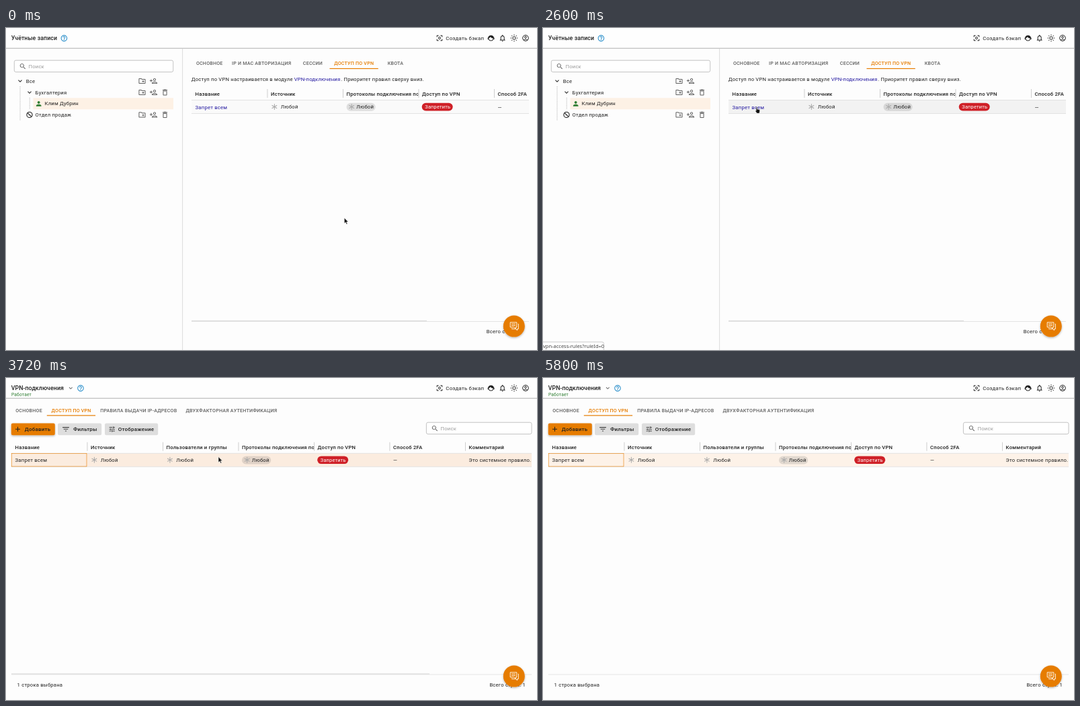
An HTML page for the animation above (5.84 s loop, 790 by 480 pixels).

```html
<!DOCTYPE html>
<html lang="ru">
<head>
<meta charset="utf-8">
<style>
html, body { margin: 0; width: 100%; height: 100%; overflow: hidden; background: #fdfdfd; }
svg { display: block; }
text { font: 7.68px Roboto, sans-serif; letter-spacing: .2px; fill: #212121; white-space: pre; }
.title { font-size: 8.78px; font-weight: 500; letter-spacing: .08px; }
.tab { font-size: 7.13px; font-weight: 500; fill: #616161; }
.head { font-weight: 500; }
.btn { font-size: 8px; font-weight: 500; }
.top { font-size: 7.9px; }
.link { fill: #2318a0; letter-spacing: .12px; }
.row { letter-spacing: .22px; }
.hint { fill: #9a9a9a; }
.chip { font-size: 7.4px; fill: #fff; }
.state { font-size: 6.58px; fill: #2e7d32; }
.url { font: 7.5px "Noto Sans", sans-serif; letter-spacing: 0; fill: #444; }
</style>
</head>
<body>
<svg id="stage" width="790" height="480" viewBox="0 0 790 480"></svg>
<script>
const ORANGE = '#e67c00', GREY = '#616161', INK = '#212121';
const LOOP = 5840, COL = 112.5;

const ICONS = {
  folder: 'M20 6h-8l-2-2H4c-1.1 0-2 .9-2 2v12c0 1.1.9 2 2 2h16c1.1 0 2-.9 2-2V8c0-1.1-.9-2-2-2zm0 12H4V6h5.2l2 2H20v10zm-8-4h2v2h2v-2h2v-2h-2v-2h-2v2h-2z',
  addUser: 'M15 12c2.2 0 4-1.8 4-4s-1.8-4-4-4-4 1.8-4 4 1.8 4 4 4zm0-6c1.1 0 2 .9 2 2s-.9 2-2 2-2-.9-2-2 .9-2 2-2zm0 8c-2.7 0-8 1.3-8 4v2h16v-2c0-2.7-5.3-4-8-4zm-6 4c.2-.7 3.3-2 6-2s5.8 1.3 6 2H9zm-3-3v-3h3v-2H6V7H4v3H1v2h3v3z',
  trash: 'M6 19c0 1.1.9 2 2 2h8c1.1 0 2-.9 2-2V7H6v12zM8 9h8v10H8V9zm7.5-5l-1-1h-5l-1 1H5v2h14V4z',
  down: 'M16.6 8.6 12 13.2 7.4 8.6 6 10l6 6 6-6z',
  search: 'M15.5 14h-.8l-.3-.3C15.4 12.6 16 11.1 16 9.5 16 5.9 13.1 3 9.5 3S3 5.9 3 9.5 5.9 16 9.5 16c1.6 0 3.1-.6 4.2-1.6l.3.3v.8l5 5 1.5-1.5zm-6 0C7 14 5 12 5 9.5S7 5 9.5 5 14 7 14 9.5 12 14 9.5 14z',
  user: 'M12 12c2.2 0 4-1.8 4-4s-1.8-4-4-4-4 1.8-4 4 1.8 4 4 4zm0 2c-2.7 0-8 1.3-8 4v2h16v-2c0-2.7-5.3-4-8-4z',
  help: 'M11 18h2v-2h-2v2zm1-16C6.5 2 2 6.5 2 12s4.5 10 10 10 10-4.5 10-10S17.5 2 12 2zm0 18c-4.4 0-8-3.6-8-8s3.6-8 8-8 8 3.6 8 8-3.6 8-8 8zm0-14c-2.2 0-4 1.8-4 4h2c0-1.1.9-2 2-2s2 .9 2 2c0 2-3 1.75-3 5h2c0-2.25 3-2.5 3-5 0-2.2-1.8-4-4-4z',
  focus: 'M5 15H3v4c0 1.1.9 2 2 2h4v-2H5zM5 5h4V3H5c-1.1 0-2 .9-2 2v4h2zm14-2h-4v2h4v4h2V5c0-1.1-.9-2-2-2zm0 16h-4v2h4c1.1 0 2-.9 2-2v-4h-2zM12 8c-2.2 0-4 1.8-4 4s1.8 4 4 4 4-1.8 4-4-1.8-4-4-4zm0 6c-1.1 0-2-.9-2-2s.9-2 2-2 2 .9 2 2-.9 2-2 2z',
  bell: 'M12 22c1.1 0 2-.9 2-2h-4c0 1.1.9 2 2 2zm6-6v-5c0-3.1-1.6-5.6-4.5-6.3V4c0-.8-.7-1.5-1.5-1.5s-1.5.7-1.5 1.5v.7C7.6 5.4 6 7.9 6 11v5l-2 2v1h16v-1zm-2 1H8v-6c0-2.5 1.5-4.5 4-4.5s4 2 4 4.5z',
  filter: 'M10 18h4v-2h-4zM3 6v2h18V6zm3 7h12v-2H6z',
  tune: 'M3 17v2h6v-2H3zM3 5v2h10V5H3zm10 16v-2h8v-2h-8v-2h-2v6h2zM7 9v2H3v2h4v2h2V9H7zm14 4v-2H11v2h10zm-6-4h2V7h4V5h-4V3h-2v6z',
  plus: 'M19 13h-6v6h-2v-6H5v-2h6V5h2v6h6z'
};

const text = (x, y, str, cls = '', extra = '') => `<text x="${x}" y="${y}" class="${cls}" ${extra}>${str}</text>`;
const rect = (x, y, w, h, fill, r = 0, extra = '') =>
  `<rect x="${x}" y="${y}" width="${w}" height="${h}" rx="${r}" fill="${fill}" ${extra}/>`;
const path = (d, color, w = 1, extra = '') => `<path d="${d}" fill="none" stroke="${color}" stroke-width="${w}" ${extra}/>`;
const ring = (x, y, r, color, w = 1) => `<circle cx="${x}" cy="${y}" r="${r}" fill="none" stroke="${color}" stroke-width="${w}"/>`;
const at = (x, y, s, body) => `<g transform="translate(${x} ${y}) scale(${s})">${body}</g>`;
const icon = (name, x, y, size = 12, color = GREY) =>
  at(x - size / 2, y - size / 2, size / 24, `<path d="${ICONS[name]}" fill="${color}"/>`);
const star = (x, y) => [0, 60, 120].map(a =>
  path('M0-4.4V4.4', '#a8a8a8', 1, `transform="translate(${x} ${y}) rotate(${a})"`)).join('');
const searchBox = (x, y, w) => rect(x, y, w, 17.4, '#fff', 2.4, 'stroke="#b4b4b4" stroke-width=".8"') +
  icon('search', x + 12.7, y + 9, 11.5) + text(x + 21.2, y + 11.8, 'Поиск', 'hint');
const tabs = (y, items, active) => items.map(([x, s], i) =>
  text(x, y, s, 'tab', i == active ? `style="fill:${ORANGE}"` : '')).join('');

function topBar() {
  let rays = '';
  for (let a = 0; a < 360; a += 45) rays += path('M0-3.9V-5.3', INK, 1, `transform="translate(756 15) rotate(${a})"`);
  return rect(0, 0, 790, 30, '#fefefe') + rect(0, 29.6, 790, 1.4, '#c6c6c6') +
    icon('focus', 645, 15, 11.5, INK) + text(654.3, 18, 'Создать бэкап', 'top') +
    ring(721.5, 15.3, 3.7, INK) + `<path d="M717 15.5a4.6 4.6 0 0 1 9.2 0q-4 .3-5.4-2.3-1 2-3.8 2.3z" fill="${INK}"/>` +
    path('M717.3 14.5v2.6M725.9 14.5v2.6', INK, 1.2) +
    icon('bell', 738.7, 15, 12, INK) + ring(756, 15, 2.2, INK) + rays +
    ring(773, 15, 4.3, INK) + ring(773, 13.8, 1.4, INK, .9) + path('M770 18q3-2.6 6 0', INK, .9);
}

function tree() {
  const tools = (y, n) => ['folder', 'addUser', 'trash'].slice(0, n).map((k, i) => icon(k, 202.5 + 17 * i, y, 12.2)).join('');
  return searchBox(12.3, 48.2, 236.4) + rect(40.5, 104.3, 208.5, 17, '#fdf1e5') +
    path('M21 87V138M35.2 104V121', '#999', .8, 'stroke-dasharray="1 1.2"') +
    icon('down', 21, 79, 11.5, INK) + text(29.8, 81.7, 'Все') + tools(79, 2) +
    icon('down', 35, 96, 11.5, INK) + text(43.6, 98.6, 'Бухгалтерия') + tools(96, 3) +
    icon('user', 48.7, 112.8, 11.5, '#2e7d32') + text(57.6, 115.4, 'Клим Дубрин') +
    ring(35, 129.4, 4.1, INK, 1.1) + path('M32.1 126.5l5.8 5.8', INK, 1.1) +
    text(43.6, 132.2, 'Отдел продаж') + tools(129.4, 3) +
    rect(262.2, 31, .9, 449, '#d9d9d9');
}

// Table whose first row starts at y; cells are [heading, kind, value].
function table(id, x, y, right, cells, bottom, thumb) {
  let out = `<rect id="${id}Row" x="${x}" y="${y}" width="${right - x}" height="20"/>` +
    rect(x, y - .4, right - x, .8, '#dedede') + rect(x, y + 19.6, right - x, .8, '#dedede');
  cells.forEach(([head, kind, value], i) => {
    const left = x + COL * i, tx = left + 5.8, base = y + 13;
    const w = Math.min(COL, right - left);
    out += `<svg x="${left}" y="${y - 20}" width="${w}" height="42">${text(5.6, 13.6, head, 'head')}</svg>`;
    if (i) out += rect(left, y - 16.5, .9, 13, '#c9c9c9');
    if (kind == 'chip') out += rect(tx - .3, y + 4.2, 43.2, 12, 'rgba(0,0,0,.11)', 6);
    if (kind == 'deny') out += rect(tx - .6, y + 4.2, 46, 11.7, '#cf2027', 5.8) + text(tx + 4, base - .2, value, 'chip');
    else if (kind == 'any' || kind == 'chip')
      out += star(tx + (kind == 'any' ? 5.1 : 7.4), y + 10) + text(tx + 14.5, base - .3, value);
    else out += text(tx - .2, base, value, kind);
  });
  return out + rect(x, bottom, right - x, .8, '#dedede') +
    `<rect id="${id}Bar" x="${x}" y="${bottom - 1.2}" width="${thumb}" height="1.4" fill="#dedede"/>`;
}

const name = ['Название', 'row', 'Запрет всем'], source = ['Источник', 'any', 'Любой'];
const rest = [['Протоколы подключения по VPN', 'chip', 'Любой'], ['Доступ по VPN', 'deny', 'Запретить'], ['Способ 2FA', 'row', '—']];

const accounts = text(7.8, 18.2, 'Учётные записи', 'title') + icon('help', 86.4, 15.2, 11.4, '#1e88c7') + tree() +
  tabs(55.1, [[282.9, 'ОСНОВНОЕ'], [336, 'IP И MAC АВТОРИЗАЦИЯ'], [441.8, 'СЕССИИ'], [488.2, 'ДОСТУП ПО VPN'], [567.8, 'КВОТА']], 3) +
  rect(481.5, 59.9, 72.3, 1.2, ORANGE) +
  text(275.8, 79.2, 'Доступ по VPN настраивается в модуле') + text(428.8, 79.2, 'VPN-подключения', 'link') +
  text(498.2, 79.2, '. Приоритет правил сверху вниз.') +
  table('a', 276, 107.5, 778, [['Название', 'link row', 'Запрет всем'], source, ...rest], 437, 350) +
  text(714.8, 455, 'Всего строк: 1');

const vpn = text(7.8, 18, 'VPN-подключения', 'title') + text(8, 27, 'Работает', 'state') +
  icon('down', 96.3, 15, 10.5) + icon('help', 111, 15.2, 11.4, '#1e88c7') +
  tabs(50.5, [[14.2, 'ОСНОВНОЕ'], [67.6, 'ДОСТУП ПО VPN'], [140.2, 'ПРАВИЛА ВЫДАЧИ IP-АДРЕСОВ'], [267.4, 'ДВУХФАКТОРНАЯ АУТЕНТИФИКАЦИЯ']], 1) +
  `<rect id="line" y="55.3" height="1.2" fill="${ORANGE}"/>` +
  rect(7.8, 67.6, 65, 17.6, ORANGE, 2.2, 'filter="url(#shade)"') + icon('plus', 17.5, 76.3, 12, INK) + text(27.8, 79.4, 'Добавить', 'btn') +
  rect(77, 67.6, 65.2, 17.6, '#dedede', 2.2) + icon('filter', 89, 76.3, 13, '#444') + text(100, 79.4, 'Фильтры', 'btn') +
  rect(147, 67.6, 79.2, 17.6, '#dedede', 2.2) + icon('tune', 157.8, 76.3, 11, '#444') + text(166.8, 79.4, 'Отображение', 'btn') +
  searchBox(625.4, 66.2, 156.6) +
  table('b', 8, 112.2, 782, [name, source, ['Пользователи и группы', 'any', 'Любой'], ...rest,
    ['Комментарий', 'row', 'Это системное правило.']], 441.6, 622) +
  `<g id="picked">${rect(8.2, 112.5, 111.8, 19.4, 'none', 0, `stroke="${ORANGE}" stroke-width=".6"`)}
   ${text(16.6, 459.5, '1 строка выбрана')}</g>` + text(719.4, 459.5, 'Всего строк: 1');

const fab = `<circle cx="755.8" cy="444.6" r="16" fill="${ORANGE}" filter="url(#shade)"/>` +
  path('M750.2 438.8h9.6v7.2h-1.6v2.2l-2.4-2.2h-5.6zM752 441.2h6M752 443.6h6M761.6 441.2h.8v7.4h-1.8v2l-2.4-2h-5.6v-1', '#fff', .9);

const $ = id => document.getElementById(id);
$('stage').innerHTML = `<defs><filter id="shade" x="-30%" y="-30%" width="160%" height="170%">
  <feDropShadow dx="0" dy="1.2" stdDeviation="1.4" flood-opacity=".3"/></filter></defs>
  ${rect(0, 0, 790, 480, '#fdfdfd')}${topBar()}<g id="accounts">${accounts}</g><g id="vpn">${vpn}</g>${fab}
  <g id="status">${rect(-4, 468, 94.5, 16, '#fff', 2.5, 'stroke="#bdbdbd" stroke-width=".8"')}${text(0, 477, 'vpn-access-rules?ruleId=0', 'url')}</g>
  <g id="cursor"><path id="arrow" d="M0 0v8.3l1.9-1.7 1.4 3 1.4-.6-1.4-2.9h2.6z" fill="#111" stroke="#fff" stroke-width=".5"/>
  <path id="hand" d="M1.2.6q.9-.9 1.5 0v3l3 .6q1 .3.9 1.4l-.7 3.9h-3.7L0 6.2q-.1-1 1.2-.4z" fill="#111" stroke="#fff" stroke-width=".4"/></g>`;

const ramp = (t, start, length) => Math.min(1, Math.max(0, (t - start) / length));
const show = (id, on) => $(id).style.display = on ? '' : 'none';

function draw(now) {
  const t = now % LOOP, second = t >= 3160, picked = t >= 3560, away = t >= 5640;
  show('accounts', !second);
  show('vpn', second);

  // The pointer glides to the link, bending slightly towards the end.
  const u = ramp(t, 1400, 677), e = u * u * (3 - 2 * u);
  const y = 283 - 165.5 * e ** 1.4, onLink = e > .97 && !second;
  $('cursor').setAttribute('transform', `translate(${503.3 - 187.3 * e} ${y})`);
  show('cursor', !away);
  show('arrow', !onLink);
  show('hand', onLink);
  show('status', t >= 2200 && !second);

  $('aRow').setAttribute('fill', y < 127.5 ? '#f2f2f2' : '#fafafa');
  $('bRow').setAttribute('fill', !picked ? '#f2f2f2' : away ? '#fdf2e8' : '#fbecdf');
  $('aBar').setAttribute('opacity', t < 1000 ? 1 - ramp(t, 300, 200) : ramp(t, 1400, 80));
  $('bBar').setAttribute('opacity', ramp(t, 3560, 80) - ramp(t, 4960, 200));
  show('picked', picked);

  const k = 1 - (1 - ramp(t, 3200, 300)) ** 2;
  $('line').setAttribute('x', 8 + 52.8 * k);
  $('line').setAttribute('width', 52.8 + 19.5 * k);
}

const begin = performance.now();
function tick() {
  draw(performance.now() - begin);
  requestAnimationFrame(tick);
}
draw(0);
requestAnimationFrame(tick);
</script>
</body>
</html>
```
